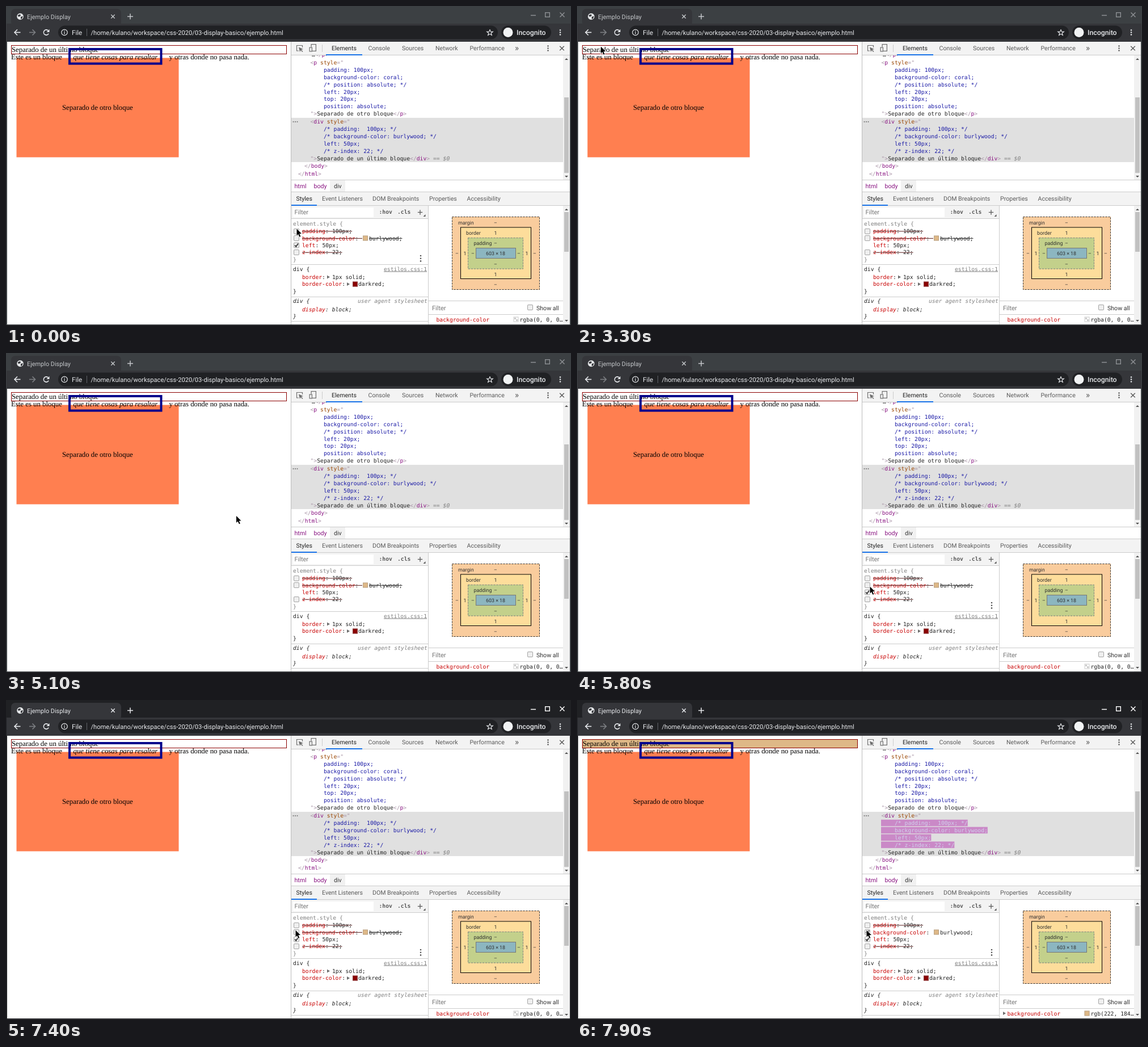
An HTML page with a canvas that plays this animation: 996 px wide and 562 px high, repeating every 8000 ms.

```html
<!DOCTYPE html>
<html lang="es">
<head>
<meta charset="utf-8">
<title>Ejemplo Display</title>
<style>
  html, body { margin: 0; width: 100%; height: 100%; overflow: hidden; }
  canvas { display: block; }
</style>
</head>
<body>
<canvas width="996" height="562"></canvas>
<script>
const ctx = document.querySelector('canvas').getContext('2d');
ctx.textRendering = 'geometricPrecision';

const LOOP = 8000, STEP = 100, FOCUS = 7400, CLICK = 7500;
const MONO = '9.73px "DejaVu Sans Mono", monospace';
const UI = '10.6px Roboto, sans-serif';
const SMALL = '8.9px Roboto, sans-serif';
const SERIF = '12.8px "Liberation Serif", serif';
const TAG = '#881280', PUNCT = '#a894a6', ATTR = '#994500', VALUE = '#1a1aa6';
const INK = '#222', GREY = '#808080', PROP = '#c80000', LINE = '#ccc', LIGHT = '#e8eaed';

// Pointer key positions: time, x, y
const PATH = [
  [0, 512, 392], [500, 512, 392], [600, 512, 395], [700, 511, 399], [800, 511, 395],
  [2000, 511, 395], [2100, 511, 394], [2200, 400, 330], [2300, 170, 190], [2400, 70, 115],
  [2900, 70, 115], [3000, 62, 92], [3100, 55, 70], [3200, 55, 70], [3600, 1, 74],
  [4000, 118, 80], [4100, 105, 80], [4300, 111, 81], [4500, 63, 72], [4600, 63, 72],
  [4700, 130, 110], [4800, 300, 210], [4900, 384, 262], [5000, 384, 262], [5400, 470, 360],
  [5600, 522, 436], [5800, 516, 411], [5900, 514, 408], [6500, 498, 382], [6700, 498, 382],
  [6800, 500, 388], [6900, 507, 402], [7000, 510, 405], [LOOP, 510, 405]
];

function pointerAt(t) {
  const i = PATH.findIndex(p => p[0] > t);
  const [t0, x0, y0] = PATH[i - 1], [t1, x1, y1] = PATH[i];
  const k = (t - t0) / (t1 - t0);
  return [x0 + (x1 - x0) * k, y0 + (y1 - y0) * k];
}

const mix = (a, b, k) => `rgb(${a.map((v, i) => Math.round(v + (b[i] - v) * k))})`;

function rect(color, x, y, w, h) {
  ctx.fillStyle = color;
  ctx.fillRect(x, y, w, h);
}

function frame(color, x, y, w, h, width = 1, dash = []) {
  ctx.strokeStyle = color;
  ctx.lineWidth = width;
  ctx.setLineDash(dash);
  ctx.strokeRect(x + width / 2, y + width / 2, w - width, h - width);
  ctx.setLineDash([]);
}

function pill(color, x, y, w, h, r) {
  ctx.fillStyle = color;
  ctx.beginPath();
  ctx.roundRect(x, y, w, h, r);
  ctx.fill();
}

function dot(color, x, y, r) {
  ctx.fillStyle = color;
  ctx.beginPath();
  ctx.arc(x, y, r, 0, 7);
  ctx.fill();
}

function trace(points) {
  ctx.beginPath();
  for (let i = 0; i < points.length; i += 2) ctx.lineTo(points[i], points[i + 1]);
}

function line(color, width, ...points) {
  trace(points);
  ctx.strokeStyle = color;
  ctx.lineWidth = width;
  ctx.stroke();
}

function poly(color, ...points) {
  trace(points);
  ctx.fillStyle = color;
  ctx.fill();
}

function ring(color, width, x, y, r, from = 0, to = 7) {
  ctx.strokeStyle = color;
  ctx.lineWidth = width;
  ctx.beginPath();
  ctx.arc(x, y, r, from, to);
  ctx.stroke();
}

function cross(color, x, y, r, width = 1.4) {
  line(color, width, x - r, y - r, x + r, y + r);
  line(color, width, x - r, y + r, x + r, y - r);
}

function plus(color, x, y, r, width = 1.3) {
  line(color, width, x - r, y, x + r, y);
  line(color, width, x, y - r, x, y + r);
}

function kebab(color, x, y, gap, r) {
  for (const d of [-gap, 0, gap]) dot(color, x, y + d, r);
}

// Draws runs given as text, colour, text, colour… and returns the end position
function write(font, x, y, ...runs) {
  ctx.font = font;
  for (let i = 0; i < runs.length; i += 2) {
    ctx.fillStyle = runs[i + 1];
    ctx.fillText(runs[i], x, y);
    x += ctx.measureText(runs[i]).width;
  }
  return x;
}

function centered(text, x, y) {
  ctx.textAlign = 'center';
  write(SMALL, x, y, text, '#303030');
  ctx.textAlign = 'left';
}

function checkbox(x, y, checked) {
  pill('#a3a3a3', x, y, 10, 10, 2);
  pill('#efefef', x + 1, y + 1, 8, 8, 1);
  if (checked) line('#333', 1.8, x + 2.2, y + 5, x + 4.2, y + 7.4, x + 8, y + 2);
}

function swatch(color, x, y) {
  rect(color, x, y, 9, 9);
  frame('rgba(128, 128, 128, .4)', x, y, 9, 9);
}

function scrollbar(top, bottom, thumbTop, thumbBottom) {
  rect('#f1f1f1', 982, top, 12, bottom - top);
  rect('#c1c1c1', 984, thumbTop, 8, thumbBottom - thumbTop);
  poly('#505050', 985, top + 8, 991, top + 8, 988, top + 5);
  poly('#505050', 985, bottom - 8, 991, bottom - 8, 988, bottom - 5);
}

function drawBrowser(focused) {
  const bar = focused ? '#202124' : '#3c4043';
  const controls = focused ? '#fff' : '#8d9094';
  const label = focused ? LIGHT : '#c4c7ca';
  rect(bar, 0, 0, 996, 562);
  pill('#35363a', 9, 5, 194, 30, 7);
  rect('#35363a', 1, 31, 994, 32);

  dot('#e4e6e8', 25, 18.5, 5.8);
  poly('#35363a', 21, 16, 25, 14.5, 26, 17, 23, 19, 21, 18);
  poly('#35363a', 26, 19, 30, 18, 28, 22.5, 26, 23);
  write('10.9px Roboto, sans-serif', 37, 22.5, 'Ejemplo Display', label);
  cross(label, 188.5, 18.5, 3.2);
  plus(label, 219, 18.5, 5, 1.5);
  line(controls, 1.5, 925, 16.5, 934, 16.5);
  frame(controls, 950, 11, 9, 9, 1.4);
  cross(controls, 980.5, 15.5, 4, 1.5);

  line(LIGHT, 1.6, 25.5, 46.5, 15.5, 46.5);
  line(LIGHT, 1.6, 20, 41.5, 15, 46.5, 20, 51.5);
  line('#7d7f83', 1.6, 41, 46.5, 51, 46.5);
  line('#7d7f83', 1.6, 46.5, 41.5, 51.5, 46.5, 46.5, 51.5);
  ring(LIGHT, 1.6, 71, 46.5, 4.6, .5, 5.5);
  poly(LIGHT, 76.5, 41, 76.5, 46, 71.5, 46);

  pill('#202124', 92, 34.5, 775, 24, 12);
  ring(LIGHT, 1.2, 103, 46.5, 5.2);
  rect(LIGHT, 102.4, 45.5, 1.2, 4);
  rect(LIGHT, 102.4, 43.3, 1.2, 1.3);
  write('11.6px Roboto, sans-serif', 116, 50.5, 'File', LIGHT);
  rect('#5f6368', 142, 40, 1, 13);
  write('11.13px Roboto, sans-serif', 149.5, 50.5,
    '/home/kulano/workspace/css-2020/03-display-basico/ejemplo.html', LIGHT);
  const star = [];
  for (let i = 0; i <= 10; i++) {
    const r = i % 2 ? 2.3 : 5.6, a = i * Math.PI / 5;
    star.push(853 + r * Math.sin(a), 47 - r * Math.cos(a));
  }
  line(LIGHT, 1.1, ...star);
  pill('#202124', 873, 34.5, 88, 24, 12);
  dot('#f1f3f4', 885, 46.5, 8.5);
  write('500 12.3px Roboto, sans-serif', 900, 51, 'Incognito', LIGHT);
  kebab(LIGHT, 977, 46.5, 4, 1.3);
}

function drawPage(filled) {
  rect('#fff', 2, 63, 500, 498);
  rect('#ff7f50', 18.5, 91.5, 286, 175);
  if (filled) rect('#deb887', 9, 69, 486, 16);
  frame('#8b0000', 9, 69, 486, 16);
  write(SERIF, 10, 81, 'Separado de un último bloque', '#000');
  write(SERIF, 9, 93.5, 'Este es un bloque', '#000');
  write(SERIF, 287.5, 93.5, 'y otras donde no pasa nada.', '#000');
  write(SERIF, 99, 183, 'Separado de otro bloque', '#000');
  frame('#00008b', 110, 74, 165.5, 29.5, 4);
  write('italic ' + SERIF, 118.5, 93.5, 'que tiene cosas para resaltar', '#000');
}

function drawTree(filled, t) {
  rect('#fff', 503, 87, 479, 219);
  ctx.save();
  ctx.beginPath();
  ctx.rect(503, 87, 479, 219);
  ctx.clip();
  write(MONO, 539, 89, '…', INK, '</', PUNCT, 'p', TAG, '>', PUNCT);
  ctx.restore();

  write(MONO, 536.5, 103, '<', PUNCT, 'p', TAG, ' style', ATTR, '="', PUNCT);
  ['padding: 100px;', 'background-color: coral;', '/* position: absolute; */',
    'left: 20px;', 'top: 20px;', 'position: absolute;']
    .forEach((s, i) => write(MONO, 560, 116 + i * 12.85, s, VALUE));
  write(MONO, 536.5, 193, '">', PUNCT, 'Separado de otro bloque', INK, '</', PUNCT, 'p', TAG, '>', PUNCT);

  rect('#e0e0e0', 503, 197, 479, 78);
  for (const x of [506.5, 510, 513.5]) dot('#6e6e6e', x, 204, 1);
  write(MONO, 536.5, 207, '<', PUNCT, 'div', TAG, ' style', ATTR, '="', PUNCT);
  const fade = (t - CLICK) / 800;
  ['/* padding:  100px; */',
    filled ? 'background-color: burlywood;' : '/* background-color: burlywood; */',
    'left: 50px;', '/* z-index: 22; */'].forEach((s, i) => {
    const y = 220 + i * 12.85;
    ctx.font = MONO;
    if (filled) rect(mix([158, 54, 153], [245, 219, 244], fade), 536, y - 9.2, 24 + ctx.measureText(s).width, 11.5);
    write(MONO, 560, y, s, filled ? mix([255, 255, 255], [26, 26, 166], fade * .4) : VALUE);
  });
  const end = write(MONO, 536.5, 271.5, '">', PUNCT, 'Separado de un último bloque', INK, '</', PUNCT, 'div', TAG, '>', PUNCT);
  write('italic ' + MONO, end, 271.5, ' == $0', GREY);
  write(MONO, 526, 285, '</', PUNCT, 'body', TAG, '>', PUNCT);
  write(MONO, 515, 298.5, '</', PUNCT, 'html', TAG, '>', PUNCT);
  scrollbar(87, 307, 161, 294);
}

function drawTabs(y, selected, tabs) {
  tabs.forEach(([x, s]) => write(UI, x, y, s, s === selected ? '#222' : '#5a5a5a'));
}

function drawRule(y, name, value, x, struck) {
  write(MONO, 522, y, name, PROP, ':', INK);
  const end = write(MONO, x, y, value + ';', INK);
  if (struck) {
    rect('#5a2020', 522, y - 3.6, (name === 'background-color' ? 628 : end) - 522, 1);
    if (name === 'background-color') rect('#333', x, y - 3.6, end - x, 1);
  }
}

function drawStyles(filled, hover) {
  rect('#fff', 503, 375, 242, 186);
  write(MONO, 506, 386.5, 'element.style {', GREY);
  checkbox(507, 392, false);
  checkbox(507, 404, filled);
  if (hover) checkbox(507, 416.5, true);
  checkbox(507, 429, false);
  drawRule(400, 'padding', '100px', 575, true);
  drawRule(412.5, 'background-color', 'burlywood', 640, !filled);
  swatch('#deb887', 629, 404.5);
  drawRule(425, 'left', '50px', 557.5);
  drawRule(437.3, 'z-index', '22', 575, true);
  write(MONO, 506, 449.5, '}', GREY);
  if (hover) kebab('#555', 731, 444.7, 4.7, 1.3);
  rect(LINE, 503, 455, 242, 1);

  write(MONO, 506, 466.5, 'div {', INK);
  write(MONO, 666, 466.5, 'estilos.css:1', GREY);
  rect(GREY, 666, 467.5, 76, 1);
  drawRule(481, 'border', '1px solid', 575);
  poly('#6e6e6e', 566, 474.5, 566, 480.5, 571, 477.5);
  drawRule(493.3, 'border-color', 'darkred', 621);
  poly('#6e6e6e', 601, 487, 601, 493, 606, 490);
  swatch('#8b0000', 611, 485.5);
  write(MONO, 506, 506, '}', INK);
  rect(LINE, 503, 512, 242, 1);

  const italic = 'italic ' + MONO;
  write(italic, 506, 523, 'div {', INK);
  write(italic, 620, 523, 'user agent stylesheet', GREY);
  write(italic, 522, 537.8, 'display', PROP, ': block;', INK);
  write(italic, 506, 549.5, '}', INK);
  rect(LINE, 503, 555, 242, 1);
}

function drawBoxModel(filled) {
  rect('#fff', 745, 352, 237, 209);
  rect('#f9cc9d', 786, 371, 155, 129);
  frame('#333', 786, 371, 155, 129, 1, [3, 2]);
  rect('#fddd9b', 801, 389.5, 125, 91.5);
  frame('#000', 801, 389.5, 125, 91.5);
  rect('#c3d08b', 814, 408, 98, 55.5);
  frame('#808080', 814, 408, 98, 55.5, 1, [3, 2]);
  rect('#8cb6c0', 828, 426, 71, 19);
  frame('#777', 828, 426, 71, 19);
  write(SMALL, 797, 384.5, 'margin', '#303030');
  write(SMALL, 811, 402.5, 'border', '#303030');
  write(SMALL, 824.5, 421, 'padding', '#303030');
  centered('603 × 18', 863, 439);
  ['–', '1', '–'].forEach((s, i) => {
    centered(s, 863, 384.5 + i * 18);
    centered(s, 863, 493.5 - i * 18);
    centered(s, 795 + i * 14, 439);
    centered(s, 932 - i * 14, 439);
  });

  rect(LINE, 745, 519, 237, 1);
  write('11px Roboto, sans-serif', 751, 536, 'Filter', '#757575');
  checkbox(919, 526, false);
  write(UI, 935, 535.5, 'Show all', '#333');
  rect(LINE, 745, 543, 237, 1);
  write(MONO, 758.5, 555.5, 'background-color', PROP);
  swatch(filled ? '#deb887' : '#fff', 894.5, 547.5);
  if (filled) poly('#6e6e6e', 751, 549, 751, 555, 756, 552);
  else poly('#ccc', 896, 549, 899, 549, 899, 552, 902, 552, 902, 555, 899, 555, 899, 552, 896, 552);
  write(MONO, 905.5, 555.5, filled ? 'rgb(222, 184…' : 'rgba(0, 0, 0…', INK);
  scrollbar(352, 561, 363, 433);
}

function drawDevtools(filled, hover, t) {
  rect('#f3f3f3', 502, 63, 492, 498);
  drawTabs(78, 'Elements', [[574, 'Elements'], [638.5, 'Console'], [698, 'Sources'],
    [757, 'Network'], [817.5, 'Performance']]);
  write('15px Roboto, sans-serif', 897, 78.5, '»', '#5a5a5a');
  line('#6e6e6e', 1.2, 516, 79, 512.5, 79, 512.5, 69.5, 522.5, 69.5, 522.5, 73);
  poly('#6e6e6e', 516, 72.5, 524, 76, 520.5, 77, 523.5, 80, 522.3, 81, 519.5, 78, 518, 81);
  frame('#6e6e6e', 537.5, 67, 9.5, 13, 1.2);
  rect('#f3f3f3', 534, 72, 6, 9);
  frame('#6e6e6e', 534.5, 72.5, 5.5, 8, 1.2);
  rect(LINE, 557, 68, 1, 13);
  kebab('#5a5a5a', 955.5, 74.5, 4, 1.3);
  cross('#5a5a5a', 980, 74.5, 3.8);
  rect(LINE, 502, 86, 492, 1);
  rect('#1a73e8', 564, 85, 64, 2);

  drawTree(filled, t);

  rect('#fff', 503, 306, 491, 22);
  rect(LINE, 503, 306, 491, 1);
  rect('#f1f1f1', 571, 307, 27, 20);
  write(UI, 508.5, 321, 'html', TAG);
  write(UI, 542.5, 321, 'body', TAG);
  write(UI, 578, 321, 'div', '#333');
  rect(LINE, 503, 327, 491, 1);
  drawTabs(343, 'Styles', [[511.5, 'Styles'], [557, 'Event Listeners'],
    [646, 'DOM Breakpoints'], [746, 'Properties'], [812.5, 'Accessibility']]);
  rect(LINE, 503, 351, 491, 1);
  rect('#1a73e8', 503, 350, 45, 2);

  rect('#fff', 506, 355, 142, 17);
  write('11px Roboto, sans-serif', 508.5, 367, 'Filter', '#757575');
  write('bold ' + MONO, 657.5, 366, ':hov', '#5a5a5a');
  write('bold ' + MONO, 690, 366, '.cls', '#5a5a5a');
  plus('#5a5a5a', 730, 363.5, 4.2);
  poly('#5a5a5a', 739.5, 367, 739.5, 371, 735.5, 371);
  rect(LINE, 503, 374, 242, 1);

  drawStyles(filled, hover);
  drawBoxModel(filled);
  rect(LINE, 744, 352, 1, 209);
  rect('#bbb', 502, 63, 1, 498);
}

function drawPointer(x, y) {
  ctx.save();
  ctx.translate(x, y);
  const shape = [.5, .5, .5, 12.5, 3.2, 10, 5.4, 14.8, 7.4, 13.9, 5.2, 9.3, 9, 9];
  line('#fff', 1.6, ...shape, .5, .5);
  poly('#000', ...shape);
  ctx.restore();
}

const start = performance.now();
let last = -1;

function tick() {
  const t = Math.floor((performance.now() - start) % LOOP / STEP) * STEP;
  if (t !== last) {
    last = t;
    const [x, y] = pointerAt(t);
    const filled = t >= CLICK;
    const hover = x > 503 && y > 375 && y < 455;
    drawBrowser(t >= FOCUS);
    drawPage(filled);
    drawDevtools(filled, hover, t);
    drawPointer(x, y);
  }
  requestAnimationFrame(tick);
}
tick();
</script>
</body>
</html>
```
